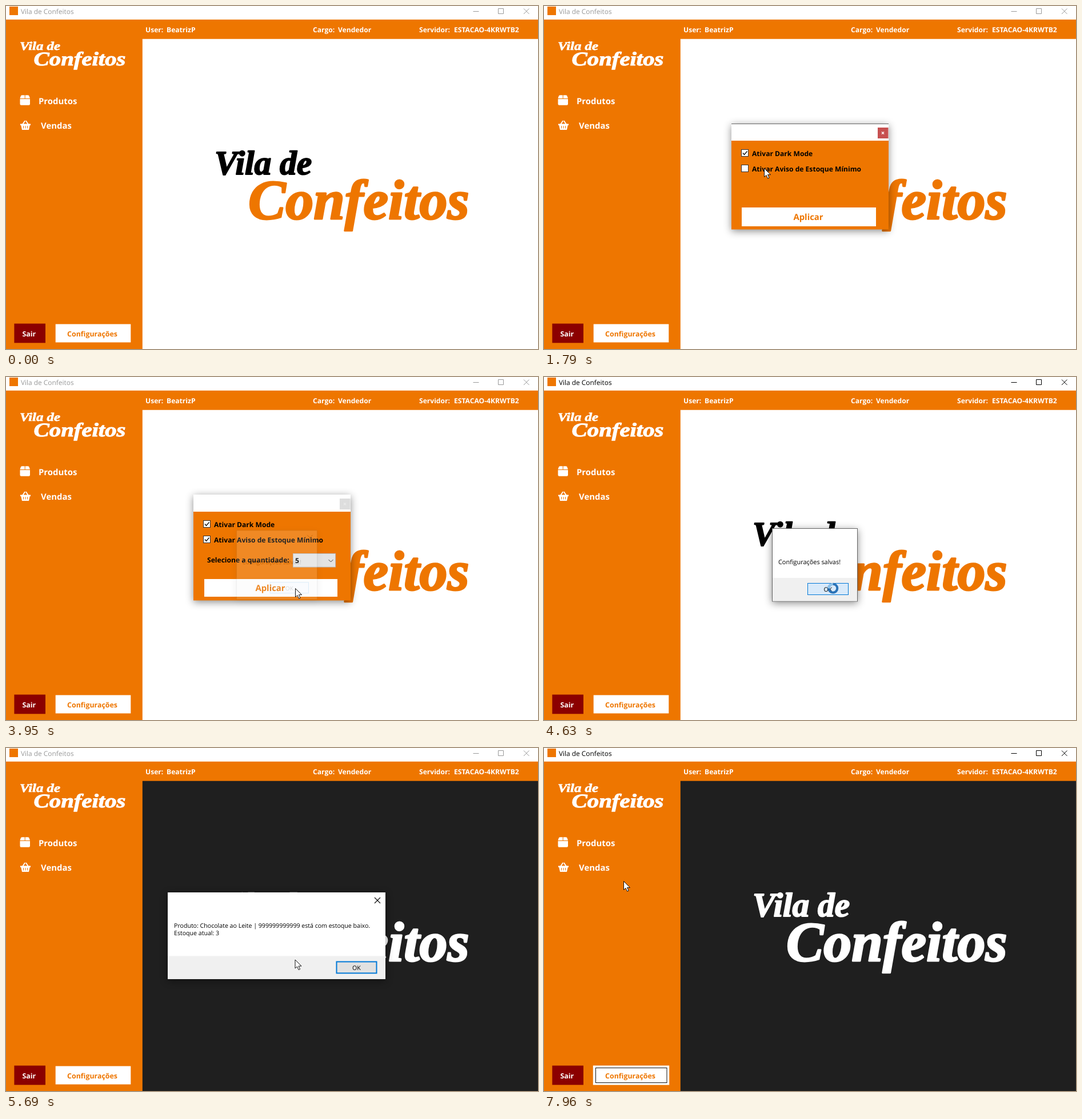
An HTML page that plays this animation: 931x601 px, repeating every 8000 ms.

```html
<!DOCTYPE html>
<html lang="pt">
<head>
<meta charset="utf-8">
<title>Vila de Confeitos</title>
<style>
  html, body { margin: 0; width: 100%; height: 100%; overflow: hidden; background: #fff; }
  svg { display: block; width: 931px; height: 601px; text-rendering: geometricPrecision; }
  text { font: 700 12.1px "Open Sans", "Noto Sans", sans-serif; white-space: pre; }
  .menu { font-size: 14.9px; }
  .button { font-size: 12.4px; text-anchor: middle; }
  .small { font-weight: 400; font-size: 10.6px; }
  .mid { text-anchor: middle; }
  .brand { font: italic 700 98px "Liberation Serif", serif; stroke-width: 3; stroke-linejoin: round; }
  .brand.top { font-size: 59.5px; stroke-width: 2; }
  .orange { fill: #ee7600; }
  .white { fill: #fff; }
  .line { fill: none; stroke: #111; }
  .popup { transform-box: fill-box; transform-origin: center; filter: drop-shadow(0 3px 7px rgba(0, 0, 0, .45)); }
</style>
</head>
<body>
<svg viewBox="0 0 931 601">
  <rect class="white" width="931" height="601"/>
  <rect id="page" x="238" y="57" width="693" height="544"/>
  <g id="logo">
    <text class="brand top" x="365" y="294.5">Vila de</text>
    <text class="brand" x="424" y="373">Confeitos</text>
  </g>

  <g id="titlebar">
    <rect class="orange" x="6" y="1" width="15" height="15"/>
    <text id="title" class="small" x="26" y="13.5" style="font-size:11.9px">Vila de Confeitos</text>
    <path id="controls" fill="none" d="M817.5 9.5h10M861.5 4.5h9v9h-9zM906 4.5l9.5 9.5M915.5 4.5l-9.5 9.5"/>
  </g>

  <path class="orange" d="M0 23.7H931V57.7H238.8V601H0z"/>
  <g class="white" stroke="#fff" transform="translate(-127.8 -25.4) scale(.416 .347)">
    <text class="brand top" x="365" y="294">Vila de</text>
    <text class="brand" x="424" y="373">Confeitos</text>
  </g>
  <g class="white">
    <text x="244" y="46.3">User:</text><text x="281" y="46.3">BeatrizP</text>
    <text x="537" y="46.3">Cargo:</text><text x="581" y="46.3">Vendedor</text>
    <text x="723" y="46.3">Servidor:</text><text x="784" y="46.3">ESTACAO-4KRWTB2</text>
    <path d="M24.5 162l1.200-4q.5-1.700 2.300-1.700h4.700v5.700zM33.700 156.300h4.700q1.800 0 2.300 1.700l1.200 4h-8.200zM24.5 163h17.500v8.700q0 2-2 2h-13.500q-2 0-2-2z"/>
    <text class="menu" x="57" y="171.5">Produtos</text>
    <path d="M25 206.500h3.500l4-6 1.500 1-3.300 5h6.600l-3.300-5 1.500-1 4 6h3.500v2.500h-1.300l-1.700 8h-12l-1.700-8h-1.300z"/>
    <path class="line" style="stroke:#ee7600" d="M30.5 210v4.5M34 210v4.5M37.5 210v4.5"/>
    <text class="menu" x="61" y="215">Vendas</text>
    <rect x="14.4" y="556.5" width="54.6" height="33.8" fill="#8b0000"/>
    <text class="button" x="40.3" y="578.5">Sair</text>
    <rect x="86.7" y="557.4" width="131.6" height="32"/>
    <g id="focus">
      <rect x="85.8" y="556.4" width="133.4" height="34"/>
      <rect class="line" x="90.5" y="560.5" width="124.5" height="26"/>
    </g>
    <text class="button orange" x="151" y="578.5">Configurações</text>
  </g>

  <g id="settings" class="popup">
    <rect class="orange" x="328" y="206" width="275" height="185.5"/>
    <rect class="white" x="328" y="206" width="275" height="30"/>
    <path id="topEdge" class="line" d="M328 206.5h275" style="stroke:#666"/>
    <rect id="closeBox" x="584" y="213" width="18.5" height="19"/>
    <path id="closeMark" fill="none" stroke="#fff" stroke-width="1.3" d="M591 220.5l4 4M595 220.5l-4 4"/>
    <g fill="#fff" stroke="#333">
      <rect x="345.5" y="251.5" width="12" height="12"/>
      <rect x="345.5" y="278.5" width="12" height="12"/>
    </g>
    <path id="darkCheck" class="line" stroke-width="1.4" d="M348 257.5l2.5 3 5-6"/>
    <path id="stockCheck" class="line" stroke-width="1.4" d="M348 284.5l2.5 3 5-6"/>
    <text x="364" y="262.5">Ativar Dark Mode</text>
    <text x="364" y="289.7">Ativar Aviso de Estoque Mínimo</text>
    <g id="quantity">
      <text x="352" y="325.3">Selecione a quantidade:</text>
      <rect x="502.5" y="309.5" width="74" height="23.5" fill="#e3e3e3" stroke="#b5bcc4"/>
      <path class="line" style="stroke:#444" d="M564.5 320l4 4 4-4"/>
      <text id="amount" x="506" y="326">5</text>
    </g>
    <rect id="apply" class="white" x="346" y="353" width="235" height="33"/>
    <text class="mid menu orange" x="462.5" y="375.3">Aplicar</text>
  </g>

  <g id="saved" class="popup">
    <rect x="399.5" y="265.5" width="149" height="127.5" fill="#fff" stroke="#666"/>
    <rect x="400" y="352" width="148" height="40.5" fill="#f0f0f0"/>
    <path id="savedClose" class="line" d="M530 274l10 10M540 274l-10 10"/>
    <text class="small" x="410" y="327.7" style="font-size:10.9px">Configurações salvas!</text>
    <rect x="461.5" y="361.5" width="71" height="20" fill="#d9eafa" stroke="#0078d7"/>
    <text class="mid small" x="497" y="376">OK</text>
  </g>

  <g id="lowStock" class="popup">
    <rect class="white" x="283" y="253" width="381" height="152"/>
    <rect x="283" y="364.5" width="381" height="40.5" fill="#f0f0f0"/>
    <path class="line" stroke-width="1.2" d="M645 262l10 10M655 262l-10 10"/>
    <text class="small" x="294" y="315">Produto: Chocolate ao Leite | 999999999999 está com estoque baixo.</text>
    <text class="small" x="294" y="327.7">Estoque atual: 3</text>
    <rect id="ok" x="578.5" y="374.5" width="70" height="20" stroke="#0078d7"/>
    <text class="mid small" x="613.5" y="388.5">OK</text>
  </g>

  <g id="pointer">
    <circle id="click" r="11" fill="#f0f046" opacity=".75"/>
    <path id="arrow" d="M.5 .5v15l3.500-3 2.600 5.700 2.500-1.100-2.600-5.500h5z" fill="#fff" stroke="#111"/>
    <g id="busy" fill="none" stroke-width="4">
      <circle r="7.5" stroke="#2b73b7"/>
      <path d="M-7.5 0A7.5 7.5 0 0 1 0-7.5" stroke="#8fc3ea"/>
    </g>
  </g>
</svg>
<script>
const LOOP = 8000, STEP = 70;
const el = {};
document.querySelectorAll("[id]").forEach(node => el[node.id] = node);

// Moments at which the screen starts updating in regular steps
const BURSTS = [0, 120, 880, 950, 1990, 2810, 3610, 3880, 4560, 5690, 6920, 7610];
// Pointer path: time, x, y
const PATH = [
  [120, 214, 598], [330, 198, 574], [600, 198, 574], [880, 252, 535],
  [1370, 398, 256], [1580, 398, 256], [1720, 385, 279], [1790, 385, 284],
  [2060, 385, 284], [2600, 540, 322], [2950, 540, 322], [3400, 508, 366],
  [3610, 508, 366], [3680, 506, 370], [5690, 505.5, 370.5], [6190, 375.5, 323.5],
  [6920, 375.5, 323.5], [7470, 618, 386], [7680, 618, 386], [7960, 139, 233]
];
const CLICKS = [450, 1450, 1990, 2700, 3880, 4560, 7610];

const ramp = (t, from, to) => Math.min(1, Math.max(0, (t - from) / (to - from)));
const within = (t, from, to) => t >= from && t < to;
const show = (node, on) => node.style.display = on ? "" : "none";
const set = (node, attrs) => Object.entries(attrs).forEach(([k, v]) => node.setAttribute(k, v));

function stepped(t) {
  const start = BURSTS.filter(b => b <= t).pop();
  return start ? start + Math.floor((t - start) / STEP) * STEP : 0;
}

function pointerAt(t) {
  const i = PATH.findIndex(p => p[0] > t);
  if (i < 1) return (i ? PATH[PATH.length - 1] : PATH[0]).slice(1);
  const [a, b] = [PATH[i - 1], PATH[i]];
  const u = ramp(t, a[0], b[0]), eased = u * u * (3 - 2 * u);
  return [1, 2].map(k => a[k] + (b[k] - a[k]) * eased);
}

function popup(node, opacity) {
  show(node, opacity > 0);
  node.style.opacity = opacity;
  node.style.transform = `scale(${.94 + .06 * opacity})`;
}

function draw(time) {
  const t = stepped(time);
  const dark = t >= 4700;
  const active = within(t, 120, 560) || within(t, 4560, 4770) || t >= 7680;

  set(el.page, { fill: dark ? "#1f1f1f" : "#fff" });
  [...el.logo.children].forEach((word, i) => {
    const color = dark ? "#fff" : ["#000", "#ee7600"][i];
    set(word, { fill: color, stroke: color });
  });
  set(el.title, { fill: active ? "#000" : "#999" });
  set(el.controls, { stroke: active ? "#000" : "#999" });
  show(el.focus, within(t, 400, 560) || t >= 7680);

  popup(el.settings, ramp(t, 530, 680) * (1 - ramp(t, 4490, 4630)));
  const front = t < 3880;
  show(el.topEdge, front);
  set(el.closeBox, { fill: front ? "#c75050" : "#ddd" });
  set(el.closeMark, { opacity: front ? 1 : .4 });
  show(el.darkCheck, t >= 1510);
  show(el.stockCheck, t >= 2060);
  show(el.quantity, t >= 2060);
  show(el.amount, t >= 2950);
  const inset = front ? 0 : 1;
  set(el.apply, { x: 346 + inset, y: 353 + inset, width: 235 - 2 * inset, height: 33 - 2 * inset });

  popup(el.saved, ramp(t, 3925, 4100) * (1 - ramp(t, 4650, 4770)));
  show(el.savedClose, t < 4560);
  popup(el.lowStock, ramp(t, 4740, 4900) * (1 - ramp(t, 7650, 7800)));

  const [x, y] = pointerAt(t);
  const hover = t > 6920 && x > 578 && y > 374;
  set(el.ok, { fill: hover ? "#d9eafa" : "#e1e1e1", "stroke-width": hover ? 1 : 2 });

  const busy = within(t, 4630, 4840);
  show(el.pointer, t >= 120);
  set(el.pointer, { transform: `translate(${x} ${y})` });
  show(el.click, CLICKS.some(c => within(t, c, c + STEP)));
  show(el.arrow, !busy);
  show(el.busy, busy);
}

function tick() {
  draw(performance.now() % LOOP);
  requestAnimationFrame(tick);
}
tick();
</script>
</body>
</html>
```
